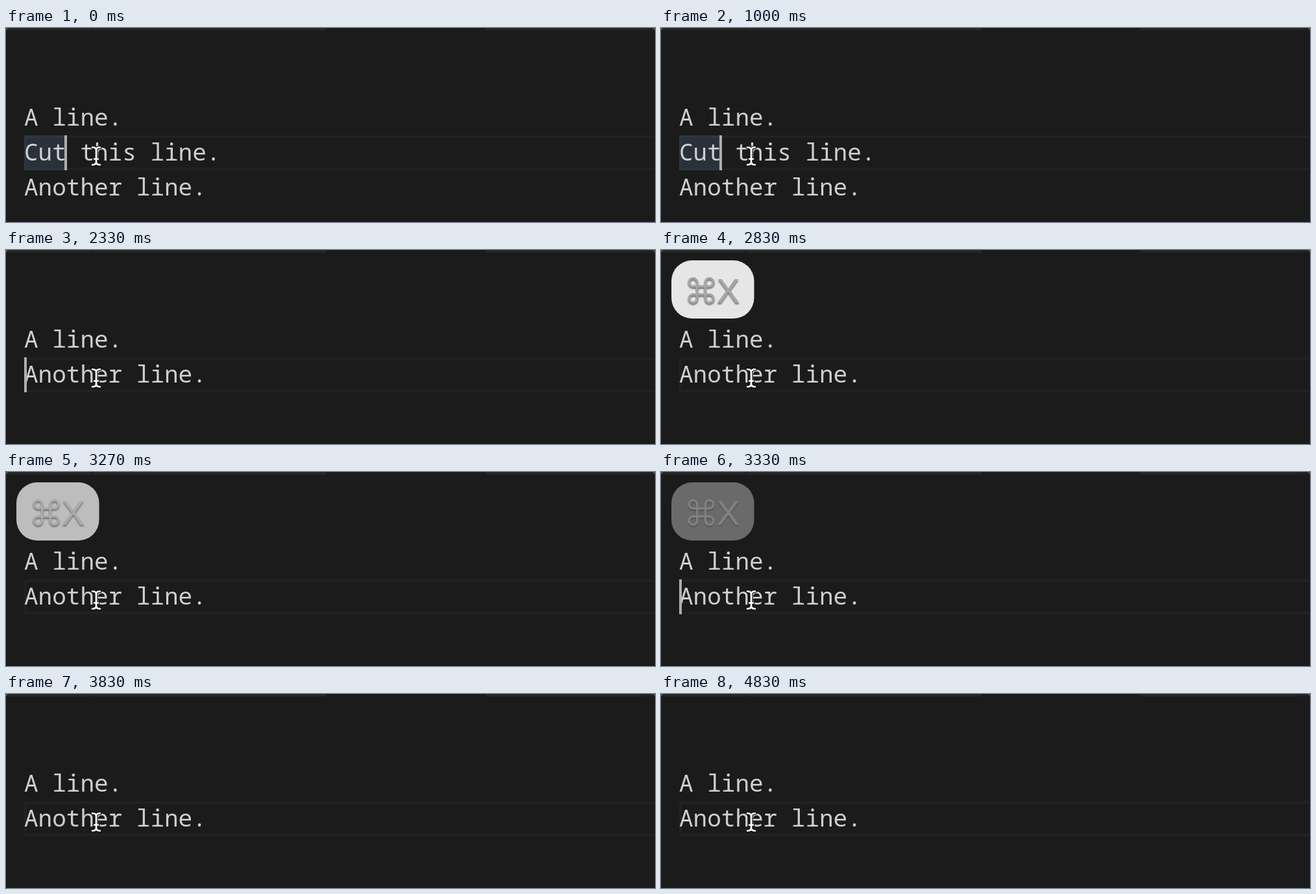
Recreate the animation shown at these times as an HTML page. Size 1000 by 300 pixels, loop 4910 ms.

```html
<!DOCTYPE html>
<html lang="en">
<head>
<meta charset="utf-8">
<title>Cut a line</title>
<style>
  html, body { margin: 0; width: 100%; height: 100%; overflow: hidden; background: #1b1b1b; }
  svg { display: block; width: 100vw; height: 100vh; }
  .code { font: 36px "Noto Sans Mono", monospace; fill: #cfcfcf; }
  .caret { fill: #aeafad; }
  #keys { filter: drop-shadow(0 2px 1px rgba(0, 0, 0, .55)); }
  #keys text { font: 54px "Liberation Sans", Arial, sans-serif; fill: #a6a6a6; }
  #keys path { fill: none; stroke: #a6a6a6; stroke-width: 1.6; }
  .pointer path { fill: none; stroke-linecap: round; stroke-linejoin: round; }
</style>
</head>
<body>
<svg viewBox="0 0 1000 300">
  <rect width="1000" height="300" fill="#1b1b1b"/>

  <!-- lower edge of the tab bar -->
  <g fill="#262626">
    <rect width="130" height="4"/>
    <rect x="132" width="362" height="4"/>
    <rect x="739" width="241" height="4"/>
    <rect x="980" width="20" height="4" fill="#222"/>
  </g>
  <path d="M0 0H4Q1 1 0 4ZM1000 0H996Q999 1 1000 4Z" fill="#555"/>

  <!-- current line -->
  <path d="M998 168H30V218H998" fill="none" stroke="#212121" stroke-width="4"/>

  <text class="code" x="28" y="151">A line.</text>
  <g id="before">
    <rect x="28" y="166" width="64.8" height="54" fill="#5b739b" fill-opacity=".25"/>
    <text class="code" x="28" y="205">Cut this line.</text>
    <text class="code" x="28" y="259">Another line.</text>
  </g>
  <text id="after" class="code" x="28" y="205">Another line.</text>
  <rect id="caretWord" class="caret" x="90" y="166" width="4" height="54"/>
  <rect id="caretStart" class="caret" x="28" y="166" width="4" height="54"/>

  <!-- the plate and its label fade separately, so the label stays lighter than the plate -->
  <rect id="plate" x="16" y="16" width="127.5" height="90" rx="32" fill="#e6e6e6"/>
  <g id="keys">
    <path transform="translate(36.8 37.3) scale(2.1)"
      d="M18 3a3 3 0 0 0-3 3v12a3 3 0 1 0 3-3H6a3 3 0 1 0 3 3V6a3 3 0 1 0-3 3h12a3 3 0 0 0 0-6z"/>
    <text x="85.5" y="82">X</text>
  </g>

  <g class="pointer">
    <path id="beam" stroke="#111" stroke-width="5"
      d="M133 184.5Q139 184.5 139 189Q139 184.5 145 184.5M139 189V207M133 211.5Q139 211.5 139 207Q139 211.5 145 211.5M136 202.5H142"/>
    <path id="beamFill" stroke="#fff" stroke-width="2.7"/>
  </g>
</svg>
<script>
const LOOP = 4910, CUT = 2330;
const get = id => document.getElementById(id);

get("beamFill").setAttribute("d", get("beam").getAttribute("d"));

// Each step is [start in ms, opacity], held until the next one.
const badge = [[0, 0], [2370, 1], [3270, .8], [3300, .58], [3330, .39], [3370, .23], [3400, .1], [3430, 0]];
const steps = {
  before: [[0, 1], [CUT, 0]],
  after: [[0, 0], [CUT, 1]],
  caretWord: [[0, 1], [500, 0], [1000, 1], [1500, 0], [2000, 1], [CUT, 0]],
  caretStart: [[0, 0], [CUT, 1], [2830, 0], [3330, 1], [3830, 0], [4330, 1], [4830, 0]],
  plate: badge,
  keys: badge
};

for (const [id, table] of Object.entries(steps)) {
  const frames = table.map(([ms, opacity]) => ({ offset: ms / LOOP, opacity, easing: "step-end" }));
  frames.push({ offset: 1, opacity: table.at(-1)[1] });
  get(id).animate(frames, { duration: LOOP, iterations: Infinity });
}
</script>
</body>
</html>
```
